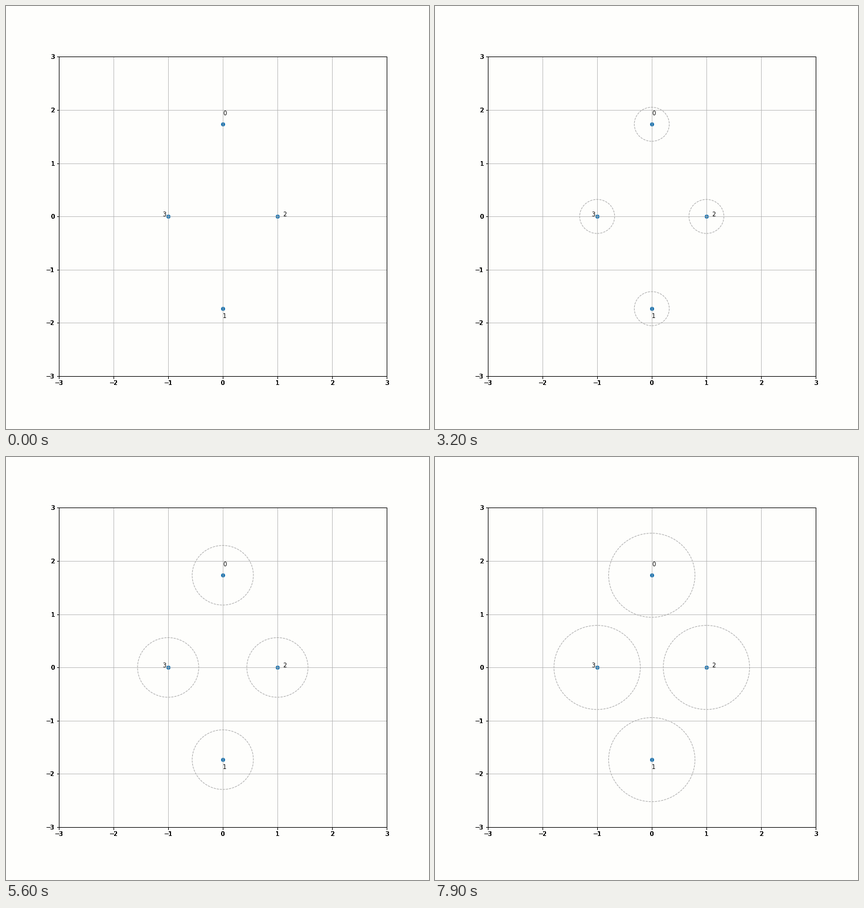
A matplotlib script for the animation above (8 s loop, 720 by 720 pixels).

```python
import numpy as np
import matplotlib.pyplot as plt
from matplotlib.animation import FuncAnimation
from matplotlib.patches import Circle

plt.rcParams["font.family"] = "DejaVu Sans"
plt.rcParams["font.size"] = 10

FRAMES, INTERVAL = 80, 100
GROWTH = 0.01  # radius gained per frame
BOX = [0.125, 0.125, 0.775, 0.755]
PAPER = "#fefefc"

points = np.array([(0, np.sqrt(3)), (0, -np.sqrt(3)), (1, 0), (-1, 0)])
label_spots = [(0, 1.9), (0, -1.91), (1.1, 0), (-1.1, 0)]

fig = plt.figure(figsize=(10, 10), dpi=72, facecolor=PAPER)


def add_plane(name):
    ax = fig.add_axes(BOX, label=name, facecolor=PAPER)
    ax.set(xlim=(-3, 3), ylim=(-3, 3),
           xticks=range(-3, 4), yticks=range(-3, 4))
    return ax


ax = add_plane("main")
ax.grid(True, color="#b0b0b0", linewidth=0.8)
ax.scatter(points[:, 0], points[:, 1], s=36, color="#1f77b4")

for i, (x, y) in enumerate(label_spots):
    ax.text(x, y, str(i))

circles = [
    ax.add_patch(Circle(p, 0, fill=False, linestyle="--", linewidth=1,
                        edgecolor="#a8a8a8"))
    for p in points
]

# Stacked axes give the tick labels and border their heavy look.
for k in range(6):
    add_plane(f"overlay {k}").patch.set_visible(False)


def update(frame):
    for c in circles:
        c.set_radius(GROWTH * frame)
        c.set_visible(frame > 0)
    return circles


anim = FuncAnimation(fig, update, frames=FRAMES, interval=INTERVAL,
                     repeat=True, repeat_delay=0, blit=False)
plt.show()
```
